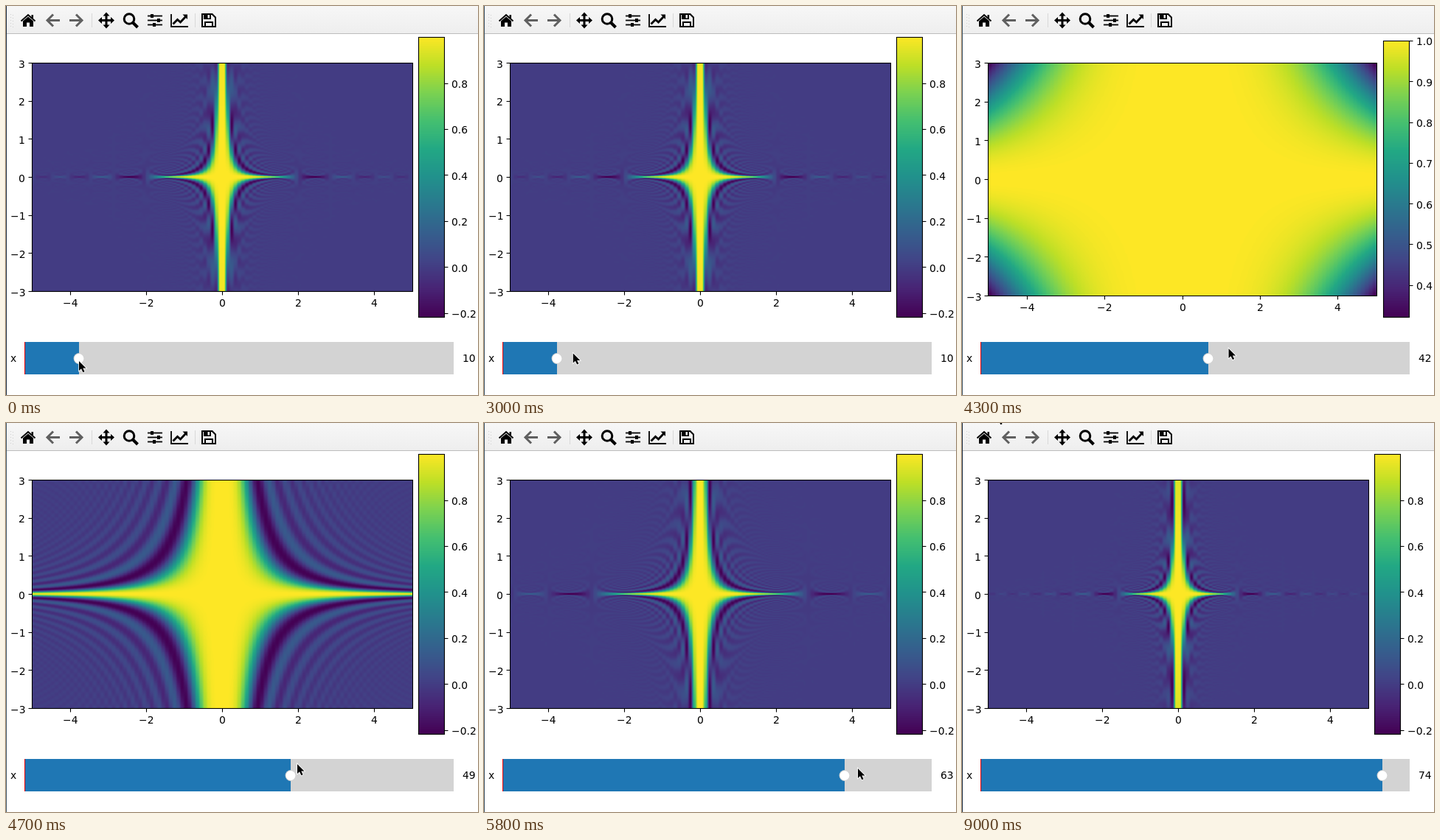
An HTML page with a canvas that plays this animation: 640 by 528 pixels, repeating every 9.1 s.

```html
<!DOCTYPE html>
<html lang="en">
<head>
<meta charset="utf-8">
<title>Slice viewer</title>
<style>
  html, body { margin: 0; width: 100%; height: 100%; overflow: hidden; background: #fff; }
  canvas { display: block; }
</style>
</head>
<body>
<canvas id="stage" width="640" height="528"></canvas>
<script>
const ctx = document.getElementById('stage').getContext('2d');
const LOOP = 9100, STEP = 100;
const SLICES = 80, COLS = 100, ROWS = 200, REACH = 4.95;
const SLIDER_LEFT = 25, SLIDER_WIDTH = 582;
const LAG = 200, RELEASE = 7600;
const FONT = '13.9px "DejaVu Sans", sans-serif';

// Pointer path: time, x, y
const path = [[400, 99, 482], [1300, 50, 477], [1700, 48, 476], [2000, 87, 474], [2400, 95, 472],
  [2900, 95, 472], [3400, 224, 469], [3600, 276, 468], [4500, 386, 464], [4700, 395, 463],
  [5600, 489, 468], [5800, 507, 469], [7000, 571, 468], [8000, 571, 468], [8400, 154, 40]];

function pointerAt(t) {
  const next = path.findIndex(key => key[0] > t);
  if (next < 1) return path.at(next).slice(1);
  const [a, b] = [path[next - 1], path[next]], f = (t - a[0]) / (b[0] - a[0]);
  return [1, 2].map(i => a[i] + (b[i] - a[i]) * f);
}

// The slider follows the pointer a little late, until the button is released.
function sliceAt(t) {
  const [x] = pointerAt(Math.min(t, RELEASE) - LAG);
  return Math.round((x - SLIDER_LEFT) / SLIDER_WIDTH * (SLICES - 1));
}

const stops = '440154 482475 414487 355f8d 2a788e 21918c 22a884 44bf70 7ad151 bddf26 fde725'
  .split(' ').map(h => [0, 2, 4].map(i => parseInt(h.slice(i, i + 2), 16)));
const viridis = Array.from({ length: 256 }, (_, i) => {
  const p = i / 255 * (stops.length - 1), k = Math.min(stops.length - 2, Math.floor(p));
  return stops[k].map((c, j) => Math.round(c + (stops[k + 1][j] - c) * (p - k)));
});

const linspace = (reach, i, count) => reach * (2 * i / (count - 1) - 1);

function field(slice) {
  const x = linspace(REACH, slice, SLICES);
  const data = new Float64Array(COLS * ROWS);
  let min = Infinity, max = -Infinity;
  for (let r = 0; r < ROWS; r++) {
    const z = linspace(3, r, ROWS);
    for (let c = 0; c < COLS; c++) {
      const y = linspace(5, c, COLS), u = x ** 3 * y * y * z;
      const v = data[r * COLS + c] = Math.sin(u) / u;
      min = Math.min(min, v);
      max = Math.max(max, v);
    }
  }
  return { data, min, max };
}

// Neighbouring samples and a Hann-window weight for each screen pixel.
function taps(pixels, count) {
  return Array.from({ length: pixels }, (_, i) => {
    const p = Math.max(0, Math.min(count - 1, (i + 0.5) / pixels * count - 0.5));
    const a = Math.floor(p);
    return [a, Math.min(count - 1, a + 1), 0.5 - 0.5 * Math.cos(Math.PI * (p - a))];
  });
}

function fieldImage({ data, min, max }, w, h) {
  const image = new ImageData(w, h);
  const xs = taps(w, COLS), ys = taps(h, ROWS);
  let o = 0;
  for (const [r0, r1, fy] of ys) {
    for (const [c0, c1, fx] of xs) {
      const top = data[r0 * COLS + c0] * (1 - fx) + data[r0 * COLS + c1] * fx;
      const low = data[r1 * COLS + c0] * (1 - fx) + data[r1 * COLS + c1] * fx;
      const n = (top + (low - top) * fy - min) / (max - min);
      const rgb = viridis[Math.max(0, Math.min(255, Math.floor(n * 256)))];
      image.data[o++] = rgb[0];
      image.data[o++] = rgb[1];
      image.data[o++] = rgb[2];
      image.data[o++] = 255;
    }
  }
  return image;
}

const label = (v, digits = 0) => v.toFixed(digits).replace('-', '\u2212');

function textWidth(s) {
  ctx.font = FONT;
  return ctx.measureText(s).width;
}

// anchor: 0 left, 0.5 centre, 1 right
function text(s, x, y, anchor = 0) {
  ctx.fillStyle = '#000';
  ctx.fillText(s, Math.round(x - anchor * textWidth(s)), Math.round(y));
}

function line(color, width, ...points) {
  ctx.strokeStyle = color;
  ctx.lineWidth = width;
  ctx.beginPath();
  points.forEach(([x, y]) => ctx.lineTo(x, y));
  ctx.stroke();
}

function rect(color, x, y, w, h) {
  ctx.fillStyle = color;
  ctx.fillRect(x, y, w, h);
}

function frame(x, y, w, h) {
  ctx.strokeStyle = '#000';
  ctx.lineWidth = 1.1;
  ctx.strokeRect(x, y, w, h);
}

function shape(color, d) {
  ctx.fillStyle = color;
  ctx.fill(new Path2D(d), 'evenodd');
}

function disc(color, x, y, r) {
  ctx.fillStyle = color;
  ctx.beginPath();
  ctx.arc(x, y, r, 0, 7);
  ctx.fill();
}

function drawToolbar() {
  const shade = ctx.createLinearGradient(0, 0, 0, 37);
  shade.addColorStop(0, '#f7f7f7');
  shade.addColorStop(1, '#eeeeee');
  rect(shade, 0, 0, 640, 37);
  rect('#bcbcbc', 0, 37, 640, 1);
  for (let y = 11; y < 28; y += 4) {
    rect('#cfcfcf', 6, y, 1, 1);
    rect('#cfcfcf', 9, y + 1, 1, 1);
  }
  for (const x of [116, 256]) rect('#d8d8d8', x, 10, 1, 19);

  // home
  line('#000', 2, [20.5, 20.5], [30, 12], [39.5, 20.5]);
  shape('#000', 'M30 14.5L37 20.5V28H32V22.5H28V28H23V20.5ZM34.5 12H37V17L34.5 15Z');
  // back and forward
  for (const [tip, dir] of [[55, 1], [104, -1]]) {
    line('#606060', 3, [tip + 9 * dir, 11.5], [tip + dir, 19.5], [tip + 9 * dir, 27.5]);
    line('#606060', 3, [tip + dir, 19.5], [tip + 18 * dir, 19.5]);
  }
  // pan
  line('#000', 3, [127, 19.5], [145, 19.5]);
  line('#000', 3, [136, 11], [136, 28]);
  shape('#000', 'M136 8.5l4.5 5h-9ZM136 30.5l4.5-5h-9ZM125 19.5l5-4.5v9ZM147 19.5l-5-4.5v9Z');
  // zoom
  ctx.lineWidth = 3;
  ctx.beginPath();
  ctx.arc(167, 17.5, 6.8, 0, 7);
  ctx.stroke();
  line('#000', 4, [171.5, 22], [178.5, 29]);
  // subplot settings
  [198, 207, 201].forEach((x, i) => {
    const y = 13.5 + 6 * i;
    line('#000', 1.8, [192, y], [212, y]);
    rect('#000', x - 2, y - 2.5, 4, 5);
  });
  // axes editor
  line('#000', 1.8, [224, 11], [224, 28], [247, 28]);
  line('#000', 2.8, [226.5, 24.5], [232.5, 18.5], [236.5, 22], [243.5, 14.5]);
  shape('#000', 'M239.5 11.5H246V18Z');
  // save
  shape('#000', 'M265 10H280L285 15V29H265ZM267 12V27H269V21H281V27H283V16L279 12H278V18H268V12ZM271 23V27H279V23ZM273.5 12V16.5H276V12Z');
}

// Round tick steps (1, 2, 5 or 10 times a power of ten), at most nine intervals.
function ticksFor(min, max) {
  const rough = (max - min) / 9, power = 10 ** Math.floor(Math.log10(rough));
  const step = power * [1, 2, 5, 10].find(m => m * power >= rough);
  const digits = Math.max(1, -Math.floor(Math.log10(step) + 1e-6));
  const ticks = [];
  for (let i = Math.ceil(min / step); i * step <= max + 1e-10; i++) ticks.push(i * step || 0);
  return { ticks, digits };
}

function drawPlot(slice) {
  const values = field(slice), { min, max } = values;
  const { ticks, digits } = ticksFor(min, max);
  const labels = ticks.map(v => label(v, digits));

  // The layout makes room for the width and the overhang of the colour bar's labels.
  const widest = Math.max(...labels.map(textWidth));
  const barRight = Math.round(594 + 33.7 - widest) + 0.5;
  const overhang = 5 - 380 * (max - ticks.at(-1)) / (max - min);
  const barTop = 42.5 + Math.max(0, Math.round(overhang)), barBottom = 422.5;
  const barHeight = barBottom - barTop, barLeft = barRight - 35;

  const w = Math.round(516 * (barRight - 35.5) / 559), h = Math.round(w * 0.3) * 2;
  const left = 35.5, top = Math.floor((barTop + barBottom - h) / 2) + 0.5, bottom = top + h;

  ctx.putImageData(fieldImage(values, w, h), left - 0.5, top - 0.5);
  frame(left, top, w, h);
  for (let v = -4; v <= 4; v += 2) {
    const x = left + w * (v + 5) / 10, px = Math.floor(x) + 0.5;
    line('#000', 1.1, [px, bottom], [px, bottom + 5]);
    text(label(v), x, bottom + 20.5, 0.5);
  }
  for (let v = -3; v <= 3; v++) {
    const y = top + h * (3 - v) / 6, py = Math.floor(y) + 0.5;
    line('#000', 1.1, [left - 5, py], [left, py]);
    text(label(v), 26, y + 6, 1);
  }

  for (let y = 0; y < barHeight; y++) {
    const color = viridis[Math.floor((1 - (y + 0.5) / barHeight) * 256)];
    rect(`rgb(${color})`, barLeft, barTop + y - 0.5, 35, 1);
  }
  frame(barLeft, barTop, 35, barHeight);
  ticks.forEach((v, i) => {
    const y = barTop + barHeight * (max - v) / (max - min) + 0.1, py = Math.floor(y) + 0.5;
    line('#000', 1.1, [barRight, py], [barRight + 5, py]);
    text(labels[i], barRight + 9.5, y + 5.9);
  });
}

function drawSlider(slice) {
  const value = label(slice);
  const width = Math.round((636.3 - 8.83 * value.length) / 1.02) - SLIDER_LEFT;
  const fill = Math.round(width * slice / (SLICES - 1)), knob = SLIDER_LEFT + fill;
  rect('#d3d3d3', SLIDER_LEFT, 456, width, 44);
  rect('#1f77b4', SLIDER_LEFT, 456, fill, 44);
  rect('#ff0000', SLIDER_LEFT, 456, 1, 44);
  disc('#d3d3d3', knob, 478.5, 7.4);
  disc('#fff', knob, 478.5, 6.4);
  text('x', 6, 483);
  text(value, SLIDER_LEFT + width * 1.02, 483);
}

function drawPointer(x, y) {
  ctx.save();
  ctx.translate(x, y);
  const arrow = new Path2D('M0 0V13L3 10.3L5.4 15.2L7.6 14.2L5.3 9.5H9.5Z');
  ctx.strokeStyle = '#fff';
  ctx.lineWidth = 1.6;
  ctx.stroke(arrow);
  ctx.fillStyle = '#000';
  ctx.fill(arrow);
  ctx.restore();
}

let lastTick = -1;
function draw(now) {
  requestAnimationFrame(draw);
  const t = Math.floor(now % LOOP / STEP) * STEP;
  if (t === lastTick) return;
  lastTick = t;
  const slice = sliceAt(t);
  rect('#fff', 0, 0, 640, 528);
  drawToolbar();
  drawPlot(slice);
  drawSlider(slice);
  const focused = t >= 400 && t < 8800;
  rect(focused ? '#41586a' : '#1c2d42', 0, 0, 1, 528);
  if (t < 8500) drawPointer(...pointerAt(t));
  else if (t >= 8800) drawPointer(47, -13);
}
requestAnimationFrame(draw);
</script>
</body>
</html>
```
